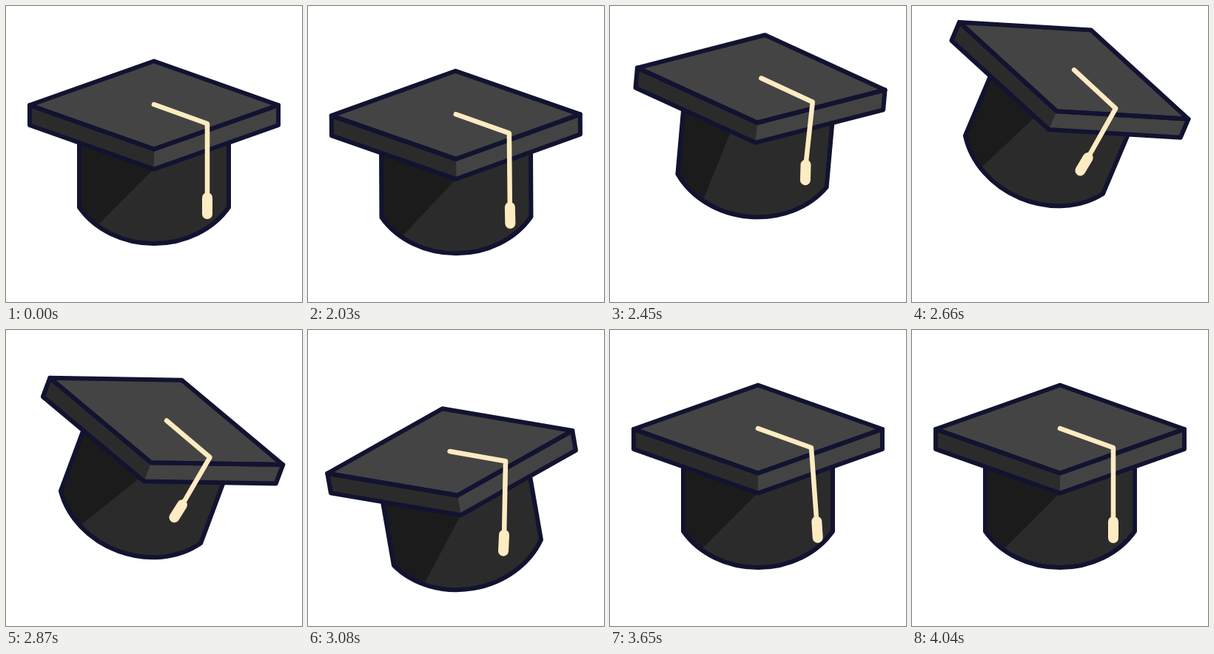
Write an HTML page with a canvas that moves like this. It is 400 px wide and 400 px high and loops after 4070 ms.

```html
<!DOCTYPE html>
<html lang="en">
<head>
<meta charset="utf-8">
<title>Graduation cap</title>
<style>
  html, body { margin: 0; width: 100%; height: 100%; overflow: hidden; background: #fff; }
  canvas { display: block; width: 100vw; height: 100vh; object-fit: contain; }
</style>
</head>
<body>
<canvas id="stage" width="400" height="400"></canvas>
<script>
const ctx = document.getElementById('stage').getContext('2d');
const LOOP = 4070, START = 2000, STEP = 30;
const RAD = Math.PI / 180;
const ARM = 48; // pivot lies this far below the board's centre

const INK = '#121331', TOP = '#444444', RIGHT = '#434343';
const SIDE = '#2b2b2b', SHADE = '#1b1b1b', CREAM = '#ffebc2';

const linear = u => u;
const speedUp = u => u * u;
const slowDown = u => 1 - (1 - u) ** 2;
const shoot = u => 1 - (1 - u) ** 3;
const smooth = u => u * u * (3 - 2 * u);

// Eases from a resting value through moves of [end time, value, ease].
function path(rest, ...moves) {
  return t => {
    let from = START, value = rest;
    for (const [end, target, ease] of moves) {
      if (t < end) {
        const u = Math.max(0, (t - from) / (end - from));
        return value + (target - value) * ease(u);
      }
      from = end;
      value = target;
    }
    return value;
  };
}

// Crouch, leap, fall and land.
const drop = path(0, [2300, 70, slowDown], [2607, -52, shoot], [3005, 36, speedUp], [3300, 0, smooth]);
const tilt = path(0, [2240, -6.9, smooth], [2750, 25.6, smooth], [3065, -10, speedUp], [3300, 0, smooth]);

// Tassel: string angle, extra angle of the end piece, string length.
const swing = path(0, [2240, -6.3, smooth], [3100, 11, slowDown], [3700, -4.5, smooth], [4030, 0, smooth]);
const bend = path(0, [2240, -17, smooth], [2750, 2, slowDown], [4030, 0, smooth]);
const cord = path(100, [2240, 100, linear], [2850, 74, slowDown], [3100, 100, smooth]);

// Edge of the shadow on the cap.
const shadeX = path(0, [2240, 7, smooth], [2450, -38, smooth], [3050, 0, smooth]);
const shadeAngle = path(45, [2240, 10, smooth], [3300, 45, linear]);

function trace(points, closed) {
  ctx.beginPath();
  points.forEach(([x, y]) => ctx.lineTo(x, y));
  if (closed) ctx.closePath();
}

function fill(points, color) {
  trace(points, true);
  ctx.fillStyle = color;
  ctx.fill();
}

function line(points, color, width, closed = false) {
  trace(points, closed);
  ctx.strokeStyle = color;
  ctx.lineWidth = width;
  ctx.stroke();
}

function drawBody(t) {
  const body = new Path2D('M-101 30V138C-80 168-42 187 0 187S80 168 101 138V30Z');
  ctx.fillStyle = SIDE;
  ctx.fill(body);
  ctx.save();
  ctx.clip(body);
  const lean = Math.tan(shadeAngle(t) * RAD);
  const edge = y => [shadeX(t) - (y - 86) * lean, y];
  fill([[-260, 20], edge(20), edge(200), [-260, 200]], SHADE);
  ctx.restore();
  ctx.strokeStyle = INK;
  ctx.lineWidth = 6;
  ctx.stroke(body);
}

function drawBoard() {
  const back = [0, -59.5], right = [168, 0], front = [0, 59.5], left = [-168, 0];
  const down = ([x, y]) => [x, y + 27];
  fill([left, front, down(front), down(left)], SIDE);
  fill([front, right, down(right), down(front)], RIGHT);
  fill([back, right, front, left], TOP);
  line([left, front, right, down(right), down(front), down(left)], INK, 6, true);
  line([back, right, front, left], INK, 6, true);
}

function drawTassel(t) {
  const hang = ([x, y], len, deg) =>
    [x - len * Math.sin(deg * RAD), y + len * Math.cos(deg * RAD)];
  const hinge = [72, 25];
  const knot = hang(hinge, cord(t), swing(t));
  const tip = hang(knot, 14 + cord(t) * 0.08, swing(t) + bend(t));
  line([[0, -1], hinge, knot], CREAM, 6.5);
  line([knot, tip], CREAM, 14);
}

function draw(t) {
  ctx.fillStyle = '#fff';
  ctx.fillRect(0, 0, 400, 400);
  ctx.save();
  ctx.lineCap = ctx.lineJoin = 'round';
  ctx.translate(200, 134 + ARM + drop(t));
  ctx.rotate(tilt(t) * RAD);
  ctx.translate(0, -ARM);
  drawBody(t);
  drawBoard();
  drawTassel(t);
  ctx.restore();
}

const origin = performance.now();
function tick() {
  const t = (performance.now() - origin) % LOOP;
  draw(START + STEP * Math.floor((t - START) / STEP));
  requestAnimationFrame(tick);
}
tick();
</script>
</body>
</html>
```
